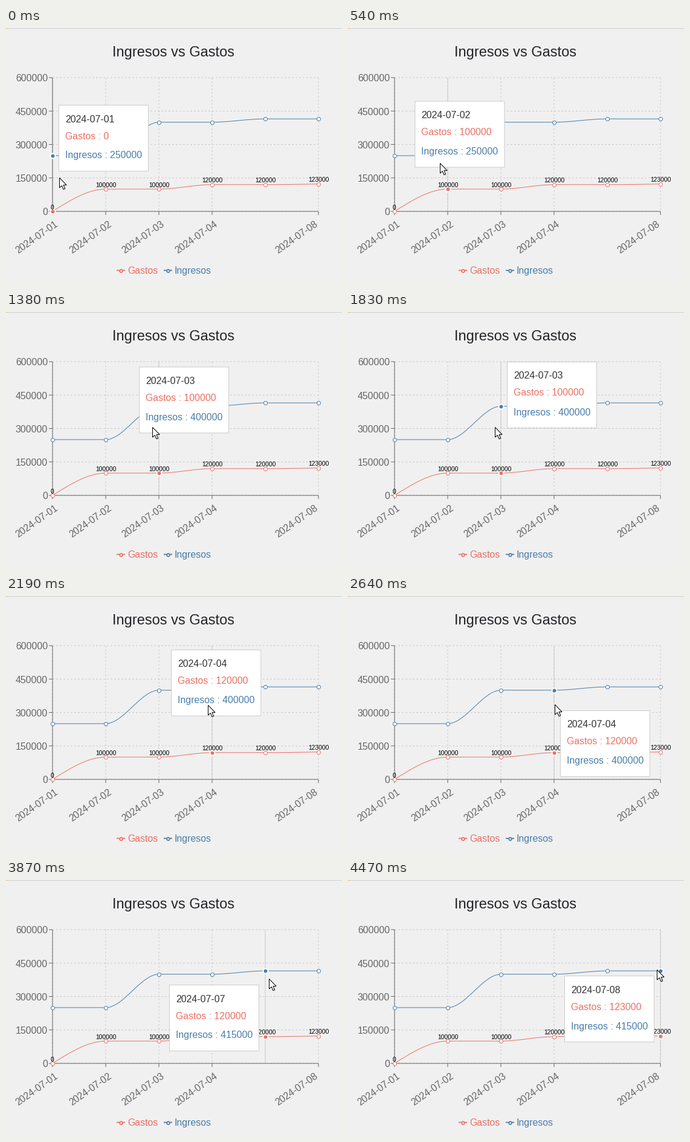
Recreate the animation shown at these times as a matplotlib script. Size 556 by 423 pixels, loop 4500 ms.

```python
import numpy as np
import matplotlib.pyplot as plt
from matplotlib.animation import FuncAnimation
from matplotlib.patches import PathPatch, Polygon, Rectangle
from matplotlib.path import Path

W, H, DPI = 556, 423, 64
STEP, FRAMES = 30, 150
RED, BLUE, GRAY, RULE = "#ec7063", "#4a7dab", "#666666", "#cccccc"
LEFT, RIGHT, TOP, BOTTOM = 77, 517, 82, 303
BOX_W, BOX_H, GAP = 149, 110, 10

DAYS = ["01", "02", "03", "04", "07", "08"]
XS = np.linspace(LEFT, RIGHT, 6)
GASTOS = [0, 100000, 100000, 120000, 120000, 123000]
INGRESOS = [250000, 250000, 400000, 400000, 415000, 415000]

plt.rcParams["font.family"] = "Liberation Sans"
plt.rcParams["path.snap"] = False


def pt(px):
    return px * 72 / DPI


def y_of(value):
    return BOTTOM - np.asarray(value) * (BOTTOM - TOP) / 600000


fig = plt.figure(figsize=(W / DPI, H / DPI), dpi=DPI, facecolor="#f0f0f0")
ax = fig.add_axes([0, 0, 1, 1])
ax.set_xlim(0, W)
ax.set_ylim(H, 0)
ax.axis("off")


def line(x0, y0, x1, y1, color=GRAY, width=1, z=2, **kw):
    return ax.plot([x0, x1], [y0, y1], color=color, lw=pt(width), zorder=z,
                   solid_capstyle="butt", **kw)[0]


def text(x, y, s, size=15.9, color=GRAY, z=5, **kw):
    return ax.text(x, y, s, fontsize=pt(size), color=color, zorder=z,
                   va="baseline", **kw)


def dots(x, y, size, face, edge, width, z):
    return ax.plot(x, y, "o", ms=pt(size), mfc=face, mec=edge,
                   mew=pt(width), zorder=z)[0]


def monotone(xs, ys):
    """Monotone cubic through the points, as a Bezier path."""
    h = np.diff(xs)
    s = np.diff(ys) / h
    m = np.zeros(len(xs))
    mean = (s[:-1] + s[1:]) / 2
    limit = np.minimum(np.minimum(abs(s[:-1]), abs(s[1:])), abs(mean) / 2)
    m[1:-1] = (np.sign(s[:-1]) + np.sign(s[1:])) * limit
    m[0] = (3 * s[0] - m[1]) / 2
    m[-1] = (3 * s[-1] - m[-2]) / 2
    verts = [(xs[0], ys[0])]
    for i, d in enumerate(h / 3):
        verts += [(xs[i] + d, ys[i] + d * m[i]),
                  (xs[i + 1] - d, ys[i + 1] - d * m[i + 1]),
                  (xs[i + 1], ys[i + 1])]
    return Path(verts, [Path.MOVETO] + [Path.CURVE4] * (len(verts) - 1))


def draw_axes():
    line(0, 0.5, W, 0.5, "#cfcfcf")
    line(0, 0.5, 2, 0.5, "#e8b458", z=3)
    text(277, 47.5, "Ingresos vs Gastos", 23.6, "#222428", ha="center")
    dash = dict(dashes=(3, 3))
    for value in range(0, 600001, 150000):
        y = float(y_of(value))
        line(LEFT, y, RIGHT, y, RULE, z=1, **dash)
        line(LEFT - 6, y, LEFT, y)
        text(69, y + 6.3, str(value), ha="right")
    for x, day in zip(XS, DAYS):
        if day == "07":
            continue
        line(x, TOP, x, BOTTOM, RULE, z=1, **dash)
        line(x, BOTTOM, x, BOTTOM + 6)
        shift = 0.5 if day == "08" else 10.5
        text(x + shift, 326, "2024-07-" + day, ha="right", rotation=35,
             rotation_mode="anchor")
    line(LEFT, TOP, LEFT, BOTTOM)
    line(LEFT, BOTTOM, RIGHT, BOTTOM)


def draw_series(values, color):
    ys = y_of(values)
    ax.add_patch(PathPatch(monotone(XS, ys), fc="none", ec=color, lw=pt(1),
                           zorder=3))
    dots(XS, ys, 6, "white", color, 1, 4)


def draw_legend(x, name, color):
    y = 400.5
    line(x, y, x + 4.7, y, color, 1.75)
    line(x + 9.3, y, x + 14, y, color, 1.75)
    dots([x + 7], [y], 4.67, "none", color, 1.75, 3)
    text(x + 18, 406, name, color=color)


draw_axes()
draw_series(GASTOS, RED)
draw_series(INGRESOS, BLUE)
for x, v in zip(XS, GASTOS):
    text(x, y_of(v) - 3.5, str(v), 10.3, "black", ha="center")
draw_legend(183, "Gastos", RED)
draw_legend(261, "Ingresos", BLUE)

# Hover parts
guide = line(LEFT, TOP, LEFT, BOTTOM, RULE, z=1.5)
hot_red = dots([LEFT], [BOTTOM], 8, RED, "white", 2, 4.5)
hot_blue = dots([LEFT], [BOTTOM], 8, BLUE, "white", 2, 4.5)
box = ax.add_patch(Rectangle((0, 0), BOX_W - 1, BOX_H - 1, fc="white",
                             ec=RULE, lw=pt(1), zorder=7))
rows = [text(0, 0, "", color=c, z=8) for c in ("#333333", RED, BLUE)]
ROW_Y = (28.5, 56.5, 88.5)
ARROW = np.array([(0, 0), (0, 16.5), (3.8, 13), (6.6, 19.2), (9.2, 18.1),
                  (6.5, 12), (11.6, 12)])
pointer = ax.add_patch(Polygon(ARROW, fc="white", ec="black", lw=pt(1),
                               joinstyle="miter", zorder=9))

# Pointer stops: time in ms, x, y
STOPS = np.array([
    (0, 88, 247), (220, 88, 247), (520, 152, 223), (1000, 152, 223),
    (1400, 243, 190), (2000, 243, 190), (2230, 342, 179), (2810, 342, 179),
    (2968, 433, 163), (3500, 433, 163), (3800, 435, 163), (3900, 435, 163),
    (4060, 511, 148), (4500, 511, 148)])


def pointer_at(t):
    i = min(np.searchsorted(STOPS[:, 0], t, "right"), len(STOPS) - 1)
    a, b = STOPS[i - 1], STOPS[i]
    k = (t - a[0]) / (b[0] - a[0])
    return a[1:] + (b[1:] - a[1:]) * k * k * (3 - 2 * k)


def goal(index, cy):
    """Where the tooltip wants to be, flipped to stay inside the plot."""
    x = XS[index] + GAP
    if x + BOX_W > RIGHT:
        x = XS[index] - GAP - BOX_W
    y = cy + GAP
    if y + BOX_H > BOTTOM:
        y = max(cy - GAP - BOX_H, TOP)
    return np.array([x, y])


# Easing cubic-bezier(.25, .1, .25, 1)
S = np.linspace(0, 1, 200)
EASE_X = 0.75 * S * (1 - S) ** 2 + 0.75 * S ** 2 * (1 - S) + S ** 3
EASE_Y = 0.3 * S * (1 - S) ** 2 + 3 * S ** 2 * (1 - S) + S ** 3


def simulate():
    """Pointer, hovered index and tooltip corner for every frame."""
    states = []
    start = end = goal(0, STOPS[0, 2])
    began = 0
    for n in range(FRAMES):
        t = n * STEP
        tip = pointer_at(t)
        index = int(np.argmin(abs(XS - tip[0])))
        want = goal(index, tip[1])
        k = np.interp((t - began) / 400, EASE_X, EASE_Y)
        corner = start + (end - start) * k
        if not np.allclose(want, end):
            start, end, began = corner, want, t
        states.append((tip, index, corner))
    return states


STATES = simulate()


def draw(n):
    tip, i, (bx, by) = STATES[n]
    pointer.set_xy(np.round(tip) + 0.5 + ARROW)
    guide.set_xdata([XS[i], XS[i]])
    hot_red.set_data([XS[i]], [y_of(GASTOS[i])])
    hot_blue.set_data([XS[i]], [y_of(INGRESOS[i])])
    box.set_xy((bx + 0.5, by + 0.5))
    words = ("2024-07-" + DAYS[i], f"Gastos : {GASTOS[i]}",
             f"Ingresos : {INGRESOS[i]}")
    for row, word, dy in zip(rows, words, ROW_Y):
        row.set_text(word)
        row.set_position((bx + 11, by + dy))
    return [pointer, guide, hot_red, hot_blue, box, *rows]


anim = FuncAnimation(fig, draw, frames=FRAMES, interval=STEP, repeat=True,
                     repeat_delay=0, blit=False)
plt.show()
```
